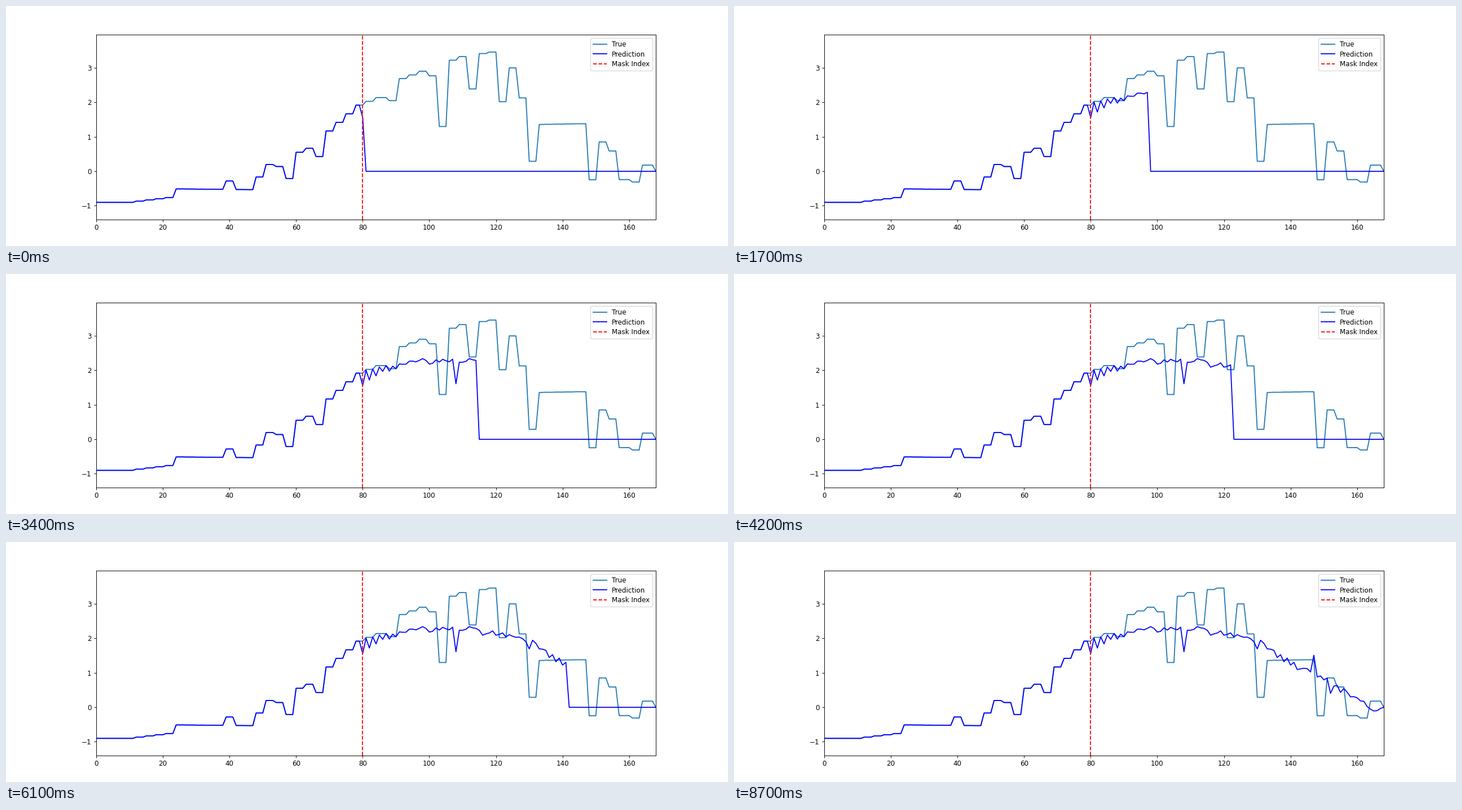
Write a matplotlib script that moves like this. It is 1280 by 427 pixels and loops after 8.8 s.

```python
import numpy as np
import matplotlib.pyplot as plt
from matplotlib.animation import FuncAnimation

DPI = 256 / 3
MASK = 80
END = 168
FRAMES = END - MASK

# Trend of the true series as (block, level), and blocks that leave it
TREND = [(3, -0.9), (7, -0.76), (8, -0.51), (15, -0.53), (17, 0.2),
         (21, 0.67), (26, 1.92), (28, 2.14), (30, 2.69), (36, 3.33),
         (39, 3.46), (41, 3.0), (42, 2.13), (44, 1.36), (48, 1.38),
         (51, 0.59), (52, -0.24), (53, -0.31), (54, 0.18)]
DIPS = {13: -0.28, 18: 0.14, 19: -0.21, 22: 0.43, 29: 2.05, 33: 2.77,
        34: 1.3, 37: 2.39, 40: 2.02, 43: 0.29, 49: -0.245}

# Trend of the forecast as (index, level), and its sharpest spikes
OUTLOOK = [(80, 1.98), (94, 2.27), (111, 2.28), (120, 2.12), (129, 1.98),
           (142, 1.15), (150, 0.82), (165, -0.08), (168, 0)]
SPIKES = {108: -0.6, 130: -0.3, 147: 0.5, 152: -0.35}


def true_series(x):
    """Hold each level for three samples, with a few late changes."""
    lag = (x >= 87) * 1 - ((x >= 135) & (x < 147)) + (x >= 159)
    block = (x - lag) // 3
    levels = np.interp(np.arange(block.max() + 1), *zip(*TREND))
    for i, level in DIPS.items():
        levels[i] = level
    y = levels[block]
    y[-1] = 0
    return y


def forecast_series(x):
    """Trend with a fading zigzag after the mask, then seeded jitter."""
    y = np.interp(x, *zip(*OUTLOOK))
    k = np.maximum(x - MASK, 0)
    fade = np.exp(-0.18 * k)
    jitter = np.random.default_rng(4).uniform(-0.1, 0.1, len(x))
    y += (1 - fade) * jitter - 0.42 * fade * (k % 2 == 0)
    for i, size in SPIKES.items():
        y[i] += size
    return y


x = np.arange(END + 1)
true = true_series(x)
full = np.where(x < MASK, true, forecast_series(x))


def prediction(step):
    """Everything up to the current index, zeros after it."""
    return np.where(x <= MASK + step, full, 0)


fig, ax = plt.subplots(figsize=(1280 / DPI, 427 / DPI), dpi=DPI)
ax.plot(x, true, label="True")
pred_line, = ax.plot(x, prediction(0), color="blue", label="Prediction")
ax.axvline(MASK, color="red", linestyle="--", label="Mask Index")
ax.set_xlim(0, END)
ax.set_ylim(true.min() - 0.5, true.max() + 0.5)
ax.legend(loc="upper right", labelspacing=0.4)


def update(step):
    pred_line.set_ydata(prediction(step))
    return pred_line,


anim = FuncAnimation(fig, update, frames=FRAMES, interval=100,
                     repeat=True, repeat_delay=0)
plt.show()
```
